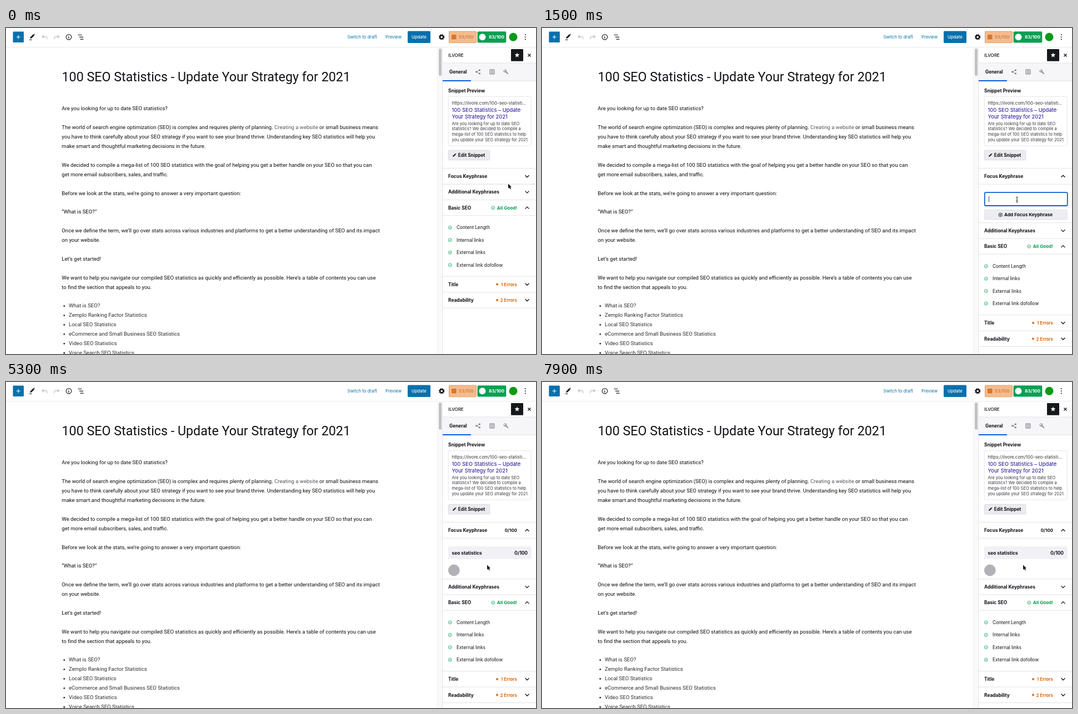
An HTML page with a canvas that plays this animation: 954 px wide and 587 px high, repeating every 8000 ms.

```html
<!DOCTYPE html>
<html lang="en">
<head>
<meta charset="utf-8">
<title>Focus keyphrase demo</title>
<style>
html, body { margin: 0; width: 100%; height: 100%; overflow: hidden; background: #fff; }
canvas { display: block; width: 954px; height: 587px; }
</style>
</head>
<body>
<canvas id="stage"></canvas>
<script>
const W = 954, H = 587, LOOP = 8000;
const canvas = document.getElementById('stage');
const ctx = canvas.getContext('2d');
const dpr = window.devicePixelRatio || 1;
canvas.width = W * dpr;
canvas.height = H * dpr;

const UI = 'Inter, sans-serif', BODY = 'Roboto, sans-serif';
const INK = '#101117', LINE = '#e4e4e7', BLUE = '#0670ad', ACCENT = '#0a5fd8';
const GREEN = '#07a052', ORANGE = '#dc6b12', GREY = '#75777d', LINK_BLUE = '#160b96';

// Timeline in ms
const OPEN_AT = 500, OPEN_MS = 280, FOCUS_AT = 1400;
const TYPE_AT = 2000, KEY_MS = 175, ADD_AT = 5100, BOUNCE_MS = 650;
const PHRASE = 'seo statistics';
const PATH = [[0, 904, 281], [400, 917, 267], [900, 917, 267], [1350, 855, 309],
              [4550, 855, 309], [4900, 866, 330]];

const ARTICLE = [
  [0, 'Are you looking for up to date SEO statistics?'],
  [2, 'The world of search engine optimization (SEO) is complex and requires plenty of planning. |Creating a website or small business means'],
  [3, 'you have to think carefully about your SEO strategy if you want to see your brand thrive. Understanding key SEO statistics will help you'],
  [4, 'make smart and thoughtful marketing decisions in the future.'],
  [6, 'We decided to compile a mega-list of 100 SEO statistics with the goal of helping you get a better handle on your SEO so that you can'],
  [7, 'get more email subscribers, sales, and traffic.'],
  [9, 'Before we look at the stats, we’re going to answer a very important question:'],
  [11, '“What is SEO?”'],
  [13, 'Once we define the term, we’ll go over stats across various industries and platforms to get a better understanding of SEO and its impact'],
  [14, 'on your website.'],
  [16, 'Let’s get started!'],
  [18, 'We want to help you navigate our compiled SEO statistics as quickly and efficiently as possible. Here’s a table of contents you can use'],
  [19, 'to find the section that appeals to you.']
];
const LINK = 'Creating a website';
const CONTENTS = ['What is SEO?', 'Zemplo Ranking Factor Statistics', 'Local SEO Statistics',
  'eCommerce and Small Business SEO Statistics', 'Video SEO Statistics', 'Voice Search SEO Statistics'];
const CHECKS = ['Content Length', 'Internal links', 'External links', 'External link dofollow'];

const clamp = v => Math.max(0, Math.min(1, v));
const ease = v => v * v * (3 - 2 * v);

// Draws text centred vertically on y; returns its width.
function text(str, x, y, size, color = INK, weight = 400, family = UI, align = 'left') {
  ctx.font = `${weight} ${size}px ${family}`;
  ctx.fillStyle = color;
  ctx.textAlign = align;
  ctx.fillText(str, x, y + size * 0.36);
  return ctx.measureText(str).width;
}
const bold = (str, x, y, size = 8.35, color = INK, align = 'left') =>
  text(str, x, y, size, color, 700, UI, align);

function box(x, y, w, h, fill, stroke, r = 0, lw = 1) {
  ctx.beginPath();
  ctx.roundRect(x, y, w, h, r);
  if (fill) { ctx.fillStyle = fill; ctx.fill(); }
  if (stroke) { ctx.strokeStyle = stroke; ctx.lineWidth = lw; ctx.stroke(); }
}
function disc(x, y, r, fill) {
  ctx.beginPath();
  ctx.arc(x, y, r, 0, 7);
  ctx.fillStyle = fill;
  ctx.fill();
}
function ring(x, y, r, color, lw = 1) {
  ctx.beginPath();
  ctx.arc(x, y, r, 0, 7);
  ctx.strokeStyle = color;
  ctx.lineWidth = lw;
  ctx.stroke();
}
// SVG path drawn with its origin at x, y.
function glyph(d, x, y, stroke, lw = 1.2, fill) {
  const p = new Path2D(d);
  ctx.save();
  ctx.translate(x, y);
  if (stroke) { ctx.strokeStyle = stroke; ctx.lineWidth = lw; ctx.stroke(p); }
  if (fill) { ctx.fillStyle = fill; ctx.fill(p); }
  ctx.restore();
}
const rule = y => box(786, y, 168, 1, LINE);
const chevron = (y, up) => glyph(up ? 'M-3.4 1.8L0-1.7 3.4 1.8' : 'M-3.4-1.8L0 1.7 3.4-1.8', 938, y, INK, 1.3);
function tick(x, y) {
  ring(x, y, 2.9, GREEN, 0.8);
  glyph('M-1.3 0L-.3 1 1.5-1', x, y, GREEN, 0.8);
}
function pencil(x, y, s) {
  ctx.save();
  ctx.translate(x, y);
  ctx.scale(s, s);
  glyph('M-4 4L-3.4 1.4 1.8-3.8 3.8-1.8-1.4 3.4ZM2.4-4.3L3-4.9 4.9-3 4.3-2.4Z', 0, 0, null, 1, INK);
  ctx.restore();
}
function gear(x, y) {
  ring(x, y, 3, INK, 2.2);
  ctx.setLineDash([1.8, 1.75]);
  ring(x, y, 4.5, INK, 1.5);
  ctx.setLineDash([]);
}
function star(x, y, r) {
  ctx.beginPath();
  for (let i = 0; i < 10; i++) {
    const a = i * Math.PI / 5 - Math.PI / 2, d = i % 2 ? r * 0.45 : r;
    ctx.lineTo(x + d * Math.cos(a), y + d * Math.sin(a));
  }
  ctx.fillStyle = '#fff';
  ctx.fill();
}

function toolbar() {
  box(0, 34.5, W, 0.8, LINE);
  box(12.5, 6.5, 19.5, 19.5, BLUE, null, 1);
  glyph('M-3.5 0H3.5M0-3.5V3.5', 22.2, 16.2, '#fff', 1.1);
  pencil(47.3, 15, 1);
  glyph('M-4.5 5.2H0', 46.5, 16, INK, 1.1);
  const undo = 'M-1.7-4.2L-4.4-1.4-1.7 1.4M-4.4-1.4H1.8Q4.6-1 4.4 3';
  glyph(undo, 69.5, 17, '#b9b9b9', 1.1);
  ctx.save();
  ctx.scale(-1, 1);
  glyph(undo, -91, 17, '#b9b9b9', 1.1);
  ctx.restore();
  ring(113, 16.3, 4.8, INK, 1.1);
  glyph('M0-.6V2.7M0-2.7V-1.5', 113, 16.3, INK, 1.2);
  glyph('M-5-3.8H2M-2.5 0H4.5M-1 3.8H5', 134.5, 16.3, INK, 1.2);

  text('Switch to draft', 614.5, 16.5, 7.75, BLUE);
  text('Preview', 683, 16.5, 7.75, BLUE);
  box(723, 5.5, 41, 21.5, BLUE, null, 1.5);
  text('Update', 743.4, 16.5, 7.7, '#fff', 500, UI, 'center');
  gear(784.2, 16.3);
  box(797.5, 6, 49, 20.7, '#f5bb8c', '#e5a069', 1);
  box(802, 12, 8.5, 8.5, '#d87530');
  text('53/100', 815, 16.5, 8.2, '#bd6a30');
  box(848.5, 6.2, 51.8, 20.4, GREEN, null, 2);
  disc(857.5, 16.3, 6, '#fff');
  bold('83/100', 869, 16.5, 8.1, '#fff');
  disc(913, 16.3, 7.5, '#079b16');
  for (const y of [12, 16.2, 20.4]) disc(934.8, y, 1, INK);
}

function article() {
  text('100 SEO Statistics - Update Your Strategy for 2021', 100.5, 88, 23.25, '#111216', 400, BODY);
  for (const [row, str] of ARTICLE) {
    const y = 145 + row * 16.9, [head, tail] = str.split('|');
    let x = 100.3 + text(head, 100.3, y, 9.56, '#0c0c0c', 400, BODY);
    if (tail) {
      x += text(LINK, x, y, 9.56, '#50545a', 400, BODY);
      text(tail.slice(LINK.length), x, y, 9.56, '#0c0c0c', 400, BODY);
    }
  }
  CONTENTS.forEach((str, i) => {
    const y = 145 + (21 + i) * 16.9;
    disc(104.8, y + 0.8, 1.4, '#222');
    text(str, 113, y, 9.58, '#2d2d2d', 400, BODY);
  });
  box(776.5, 35.5, 9, 552, '#fafafa');
  box(776.5, 35.5, 0.7, 552, '#e8e8e8');
  box(779, 37, 5, 49, '#c1c1c1', null, 2.5);
}

function panelTop() {
  box(785.3, 35, 0.8, 552, '#dcdce0');
  text('ILVORE', 796, 49, 8, INK, 500);
  box(909, 38, 22, 21.7, '#17181b', null, 1);
  star(920, 49, 4.6);
  glyph('M-2.5-2.5L2.5 2.5M2.5-2.5L-2.5 2.5', 942, 49, INK, 1.2);
  box(786, 63, 168, 32, '#f6f6f8');
  rule(62.5);
  rule(95);
  bold('General', 798, 79.3, 8.3);
  box(786, 94, 51, 2, ACCENT);
  glyph('M3-3L-3 0 3 3', 849.5, 79, GREY, 0.9);
  for (const [x, y] of [[3, -3], [-3, 0], [3, 3]]) disc(849.5 + x, 79 + y, 1.4, GREY);
  box(871, 75, 8, 8, null, GREY, 0, 1);
  glyph('M-2.5-2H2.5M-2.5 0H2.5M-2.5 2H2.5', 875, 79, GREY, 0.9);
  glyph('M-1-1L3.6 3.6', 900, 79, GREY, 1.7);
  ctx.beginPath();
  ctx.arc(898.2, 77.2, 2, -1.9, 3.5);
  ctx.strokeStyle = GREY;
  ctx.lineWidth = 1.3;
  ctx.stroke();

  bold('Snippet Preview', 796, 113.2);
  box(796.3, 123.5, 149, 88.5, '#fff', '#e3e3e6', 1, 0.8);
  text('https://ilvore.com/100-seo-statisti...', 802.5, 135, 7.9, '#333');
  text('100 SEO Statistics – Update', 802.5, 147.5, 9.5, LINK_BLUE);
  text('Your Strategy for 2021', 802.5, 159.5, 9.5, LINK_BLUE);
  ['Are you looking for up to date SEO', 'statistics? We decided to compile a',
   'mega-list of 100 SEO statistics to help', 'you update your SEO strategy for 2021.']
    .forEach((str, i) => text(str, 802.5, 172 + i * 9.65, 7.48, '#38393f'));
  box(796.3, 220.3, 74.7, 17.4, '#ebebf0', '#d3d4da', 1.5, 0.8);
  pencil(807, 229, 0.72);
  bold('Edit Snippet', 813.8, 229.2, 8.25);
  rule(252);
}

function addButton() {
  box(796.3, 327.5, 149, 17.5, '#ecedf2', '#dddee4', 1.5, 0.8);
  ring(825.3, 336.4, 3.2, INK, 0.9);
  glyph('M-1.6 0H1.6M0-1.6V1.6', 825.3, 336.4, INK, 0.9);
  bold('Add Focus Keyphrase', 832, 336.4, 8.2);
}
function keyphraseInput(t) {
  const focused = t >= FOCUS_AT;
  if (focused) box(796.8, 296.2, 149, 23.8, '#fff', ACCENT, 1.5, 1.8);
  else box(796.5, 296.5, 149, 23.3, '#fff', '#c6c7cd', 1.5, 0.9);
  const n = Math.max(0, Math.floor((t - TYPE_AT) / KEY_MS) + 1);
  const w = text(PHRASE.slice(0, n), 804, 308.2, 9.4);
  if (focused) box(804.2 + w, 302.5, 0.8, 11, '#222');
}
function phraseResult(t) {
  box(796, 296, 149.5, 22.7, '#f0f0f5', null, 1);
  bold('seo statistics', 802.5, 307.5, 8.35);
  bold('0/100', 939, 307.5, 8.35, INK, 'right');
  // Two overlapping circles that grow and shrink in opposite phase
  const k = Math.abs((((t - 5300) / BOUNCE_MS) % 2 + 2) % 2 - 1);
  for (const v of [k, 1 - k]) {
    const r = 10.4 * ease(v);
    if (r > 0.05) disc(806.3, 339, r, 'rgba(125,125,138,0.6)');
  }
}

function sections(t) {
  const done = t >= ADD_AT, open = t >= OPEN_AT;
  const grow = done ? 73.5 : 69.5 * ease(clamp((t - OPEN_AT) / OPEN_MS));
  bold('Focus Keyphrase', 796, 267);
  if (done) bold('0/100', 920, 267.3, 7.8, INK, 'right');
  chevron(267, open);
  rule(280.7);
  if (open) {
    ctx.save();
    ctx.beginPath();
    ctx.rect(786, 281.5, 168, Math.max(0, grow - 0.8));
    ctx.clip();
    if (done) phraseResult(t);
    else { keyphraseInput(t); addButton(); }
    ctx.restore();
  }

  ctx.save();
  ctx.translate(0, grow);
  for (const y of [280.7, 309, 337.3, 446.7, 475.2, 503.6]) rule(y);
  bold('Additional Keyphrases', 796, 295.4);
  chevron(295.4);
  bold('Basic SEO', 796, 323.8);
  tick(876.7, 323.8);
  bold('All Good!', 920, 324, 8.1, GREEN, 'right');
  chevron(323.8, true);
  CHECKS.forEach((str, i) => {
    const y = 359.4 + i * 22.4;
    tick(799.3, y);
    text(str, 811, y, 8.25);
  });
  [['Title', '1 Errors', 461.5], ['Readability', '2 Errors', 490]].forEach(([name, note, y]) => {
    bold(name, 796, y);
    disc(884, y, 2, ORANGE);
    bold(note, 920, y + 0.2, 7.95, ORANGE, 'right');
    chevron(y);
  });
  ctx.restore();
}

function pointer(t) {
  if (t >= TYPE_AT && t < 4550) return;
  let i = 0;
  while (i < PATH.length - 2 && t >= PATH[i + 1][0]) i++;
  const [t0, x0, y0] = PATH[i], [t1, x1, y1] = PATH[i + 1];
  const k = ease(clamp((t - t0) / (t1 - t0)));
  const x = x0 + (x1 - x0) * k, y = y0 + (y1 - y0) * k;
  const overRow = y < 280.5;
  const overInput = t > OPEN_AT && t < ADD_AT && y > 296 && y < 320;
  const overButton = t > 4550 && t < ADD_AT && y >= 327;
  if (overInput) {
    const d = 'M-2-4.7Q0-4.7 0-3.4Q0-4.7 2-4.7M0-3.4V3.4M-2 4.7Q0 4.7 0 3.4Q0 4.7 2 4.7M-1 1.4H1';
    glyph(d, x, y, '#fff', 2);
    glyph(d, x, y, '#111', 0.9);
  } else if (overRow || overButton) {
    glyph('M-1.3 5V.4Q-.3-1 .6.4V3.2L4.4 4Q5.4 4.5 5 6.4L4.2 9.5H-.6L-3.4 5.8Q-2.9 4.3-1.3 5.6Z', x, y, '#111', 0.9, '#fff');
    glyph('M1.2 5.6V7.8M2.9 5.6V7.8', x, y, '#111', 0.6);
  } else {
    glyph('M0 0V8.6L2 6.8 3.4 9.8 4.9 9.1 3.5 6.2H6.1Z', x, y - 0.6, '#fff', 1.4, '#111');
  }
}

function draw(now) {
  const t = now % LOOP;
  ctx.setTransform(dpr, 0, 0, dpr, 0, 0);
  ctx.fillStyle = '#fff';
  ctx.fillRect(0, 0, W, H);
  toolbar();
  article();
  panelTop();
  sections(t);
  pointer(t);
}

const start = performance.now();
function loop() {
  draw(performance.now() - start);
  requestAnimationFrame(loop);
}
loop();
</script>
</body>
</html>
```
